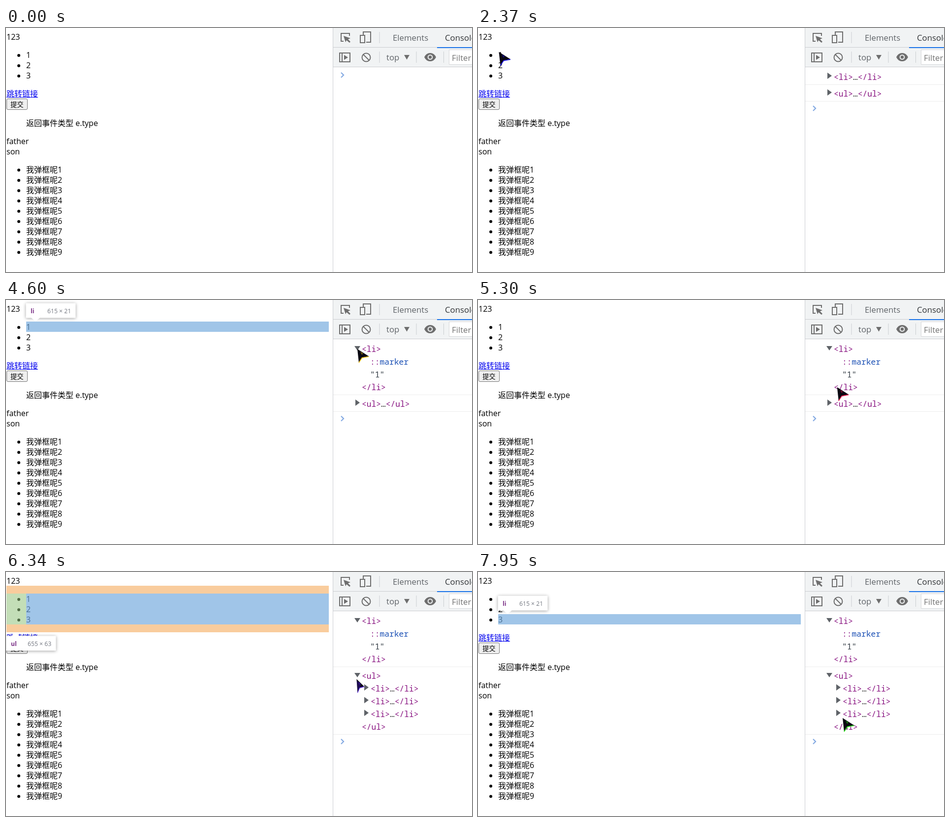
An HTML page that plays this animation: 947x498 px, repeating every 8 s.

```html
<!DOCTYPE html>
<html lang="zh">
<head>
<meta charset="utf-8">
<style>
html, body { margin: 0; width: 100%; height: 100%; overflow: hidden; background: #fff; }
svg { display: block; width: 947px; height: 498px; }
text { font: 16px "Open Sans", "Noto Sans CJK SC", sans-serif; white-space: pre; }
.bar { font-size: 16.8px; fill: #5f6368; }
.code { font: 16.25px "Noto Sans Mono", monospace; fill: #881280; }
.tip { font-size: 12.2px; fill: #737780; }
.name { font-weight: bold; fill: #7b3187; }
.icon { fill: none; stroke: #6e6e6e; stroke-width: 2; }
.solid { fill: #6e6e6e; }
.bubble { filter: drop-shadow(0 1px 3px rgba(0,0,0,.38)); fill: #fff; }
</style>
</head>
<body>
<svg viewBox="0 0 947 498">
  <g id="page"></g>
  <g id="tools">
    <path d="M665 0H947V79H665Z" fill="#f1f3f4"/>
    <path d="M664.5 0V498M665 39.5H947M665 79.5H947M759 8V31M759 48V71M834 48V71M889.5 48V71" fill="none" stroke="#cacdd1"/>
    <path d="M876 39H947V41H876Z" fill="#1a73e8"/>
    <path class="icon" d="M686 27H681V11H698V16"/>
    <path class="solid" d="M686 16L700 21L695 23L700 28L698 30L692 25L690 29Z"/>
    <path class="icon" d="M726 14V8H741V29H732M720 15H729V30H720Z"/>
    <path class="icon" d="M678 51H699V69H678ZM683 51V69"/>
    <path class="solid" d="M687 55L695 60L687 65Z"/>
    <circle class="icon" cx="732" cy="60" r="8.5"/>
    <path class="icon" d="M726 54L738 66"/>
    <path class="solid" d="M809 55H820L814.5 64.5Z"/>
    <path class="solid" d="M850 59.5Q854 51 862 51T874 59.5Q870 68 862 68T850 59.5Z"/>
    <circle cx="862" cy="59.5" r="4.3" fill="none" stroke="#f1f3f4" stroke-width="2"/>
    <path d="M900.5 44.5H960V74.5H900.5Z" fill="#fff" stroke="#d5d7da"/>
    <text class="bar" x="786" y="26">Elements</text>
    <text class="bar" x="892" y="26" style="fill:#303336">Console</text>
    <text class="bar" x="773" y="66">top</text>
    <text class="bar" x="906" y="67" style="fill:#757575">Filter</text>
  </g>
  <g id="log"></g>
  <g id="overlay"></g>
  <g id="pointer"></g>
</svg>
<script>
const LOOP = 8000, START = 500, STEP = 7450 / 106, ROW = 26;
const $ = id => document.getElementById(id);
const text = (x, y, s, cls = '', attrs = '') => `<text x="${x}" y="${y}" class="${cls}" ${attrs}>${s}</text>`;
const rect = (x, y, w, h, fill) => `<rect x="${x}" y="${y}" width="${w}" height="${h}" fill="${fill}"/>`;
const path = (d, attrs) => `<path d="${d}" ${attrs}/>`;
const clamp = (v, low, high) => Math.max(low, Math.min(high, v));

function list(y, count, prefix) {
  return Array.from({ length: count }, (_, i) =>
    `<circle cx="26" cy="${y + 21 * i - 5}" r="3"/>` + text(41, y + 21 * i, prefix + (i + 1))).join('');
}

function drawPage() {
  return text(1, 24, '123') + list(61, 3, '') +
    text(1, 140, '跳转链接', '', 'fill="#0000ee"') + rect(1, 141, 64, 1, '#0000ee') +
    '<rect x="1.5" y="144.5" width="42" height="22" rx="2.5" fill="#efefef" stroke="#767676"/>' +
    text(9, 161, '提交', '', 'style="font-size:13.33px"') +
    text(41, 200, '返回事件类型 e.type') +
    text(1, 237, 'father') + text(1, 258, 'son') + list(295, 9, '我弹框呢');
}

// Console lines: functions of the baseline y.
const code = (x, s) => y => text(x, y + 1, s, 'code');
const open = tag => `&lt;${tag}&gt;`, close = tag => `&lt;/${tag}&gt;`;
const folded = (x, tag) => y =>
  path(`M${x - 13} ${y - 14}l9 6.5l-9 6.5z`, 'fill="#5f6368"') +
  code(x, `${open(tag)}<tspan fill="#333">…</tspan>${close(tag)}`)(y);
const unfolded = (tag, children) => [
  y => path(`M708 ${y - 11}h12l-6 9z`, 'fill="#5f6368"') + code(723, open(tag))(y),
  ...children,
  code(723, close(tag)),
];
const itemLines = unfolded('li', [
  code(740, '::<tspan fill="#1a4fb4">marker</tspan>'),
  code(740, '<tspan fill="#303942">"1"</tspan>'),
]);
const listLines = unfolded('ul', Array(3).fill(folded(741, 'li')));

function drawLog(t) {
  const entries = t < 2300 ? [] : [
    t < 4430 ? [folded(723, 'li')] : itemLines,
    t < 6050 ? [folded(723, 'ul')] : listLines,
  ];
  let y = 105, out = '';
  for (const lines of entries) {
    for (const line of lines) {
      out += line(y);
      y += ROW;
    }
    out += path(`M665 ${y - 15.5}H947`, 'stroke="#ededed"');
    y += 8;
  }
  return out + path(`M681 ${y - 14}l5 5l-5 5`, 'fill="none" stroke="#83a9e2" stroke-width="2.2"');
}

// The hovered console row decides which page element is highlighted.
function hovered(t, { x, y }) {
  if (x < 700) return null;
  if (y < 200) return y < 113 ? 0 : null;
  const row = Math.floor((y - 225) / ROW);
  return t >= 6050 && row >= 0 && row < 3 ? row : 'ul';
}

function tooltip(x, y, name, size, arrow) {
  return path(`M${x} ${y}h100v29h-100z`, 'class="bubble" stroke="#fff" stroke-linejoin="round"') +
    path(arrow, 'fill="#fff"') + text(x + 9, y + 20, name, 'tip name') + text(x + 43, y + 20, size, 'tip');
}

function drawHover(target) {
  const content = 'rgba(111,168,220,.66)', margin = 'rgba(246,178,107,.66)';
  if (target === null) return '';
  if (target === 'ul')
    return rect(1, 28, 655, 16, margin) + rect(1, 107, 655, 16, margin) +
      rect(1, 44, 40, 63, 'rgba(147,196,125,.55)') + rect(41, 44, 615, 63, content) +
      tooltip(1, 131, 'ul', '655 × 63', 'M11 131l8.5-8l8.5 8z');
  const y = 44 + 21 * target;
  return rect(41, y, 615, 21, content) +
    tooltip(41, y - 37, 'li', '615 × 21', `M51 ${y - 8}l9 8l9-8z`);
}

// Key points of the pointer's route: time, x, y
const route = [
  [500, 84, -5], [900, 50, 76], [1400, 39, 47], [3000, 45, 50], [3382, 342, 57], [3840, 714, 100],
  [4600, 714, 100], [5000, 744, 150], [5650, 711, 215], [6300, 711, 215], [6965, 739, 286],
  [7250, 749, 316], [7950, 741, 298],
];

function pointerAt(t) {
  const next = clamp(route.findIndex(([time]) => time >= t), 1, route.length - 1);
  const [t0, x0, y0] = route[next - 1], [t1, x1, y1] = route[next];
  const p = clamp((t - t0) / (t1 - t0), 0, 1);
  return { x: x0 + (x1 - x0) * p, y: y0 + (y1 - y0) * p };
}

// The arrow keeps turning about its left side while its rim cycles through the hues.
function drawPointer(t, { x, y }) {
  const width = clamp(1.9 * Math.abs(Math.sin(Math.PI * (t - 1400) / 1200)), .17, 1);
  const color = `hsl(${322 - .0865 * (t - 1400)} 90% 52%)`;
  return `<g transform="translate(${x} ${y}) scale(${width} 1)">` +
    path('M0 0L23.5 15L9.5 17.5L3 28Z', 'fill="#0a0812"') +
    path('M23.5 15.5L9.5 18L3 28', `fill="none" stroke="${color}" stroke-width="1.5"`) +
    path('M6 5L12 9L9 12Z', `fill="${color}" opacity=".45"`) +
    path('M0 3L15 11L4 25Z', `fill="${color}" opacity="${.8 * (1 - width)}"`) + '</g>';
}

$('page').innerHTML = drawPage();
const origin = performance.now();
let shown = -1;
function frame() {
  const now = (performance.now() - origin) % LOOP;
  const t = now < START ? 0 : START + Math.floor((now - START) / STEP + 1e-6) * STEP;
  if (t !== shown) {
    shown = t;
    const tip = pointerAt(t);
    $('log').innerHTML = drawLog(t);
    $('overlay').innerHTML = drawHover(hovered(t, tip));
    $('pointer').innerHTML = t < START ? '' : drawPointer(t, tip);
  }
  requestAnimationFrame(frame);
}
frame();
</script>
</body>
</html>
```
